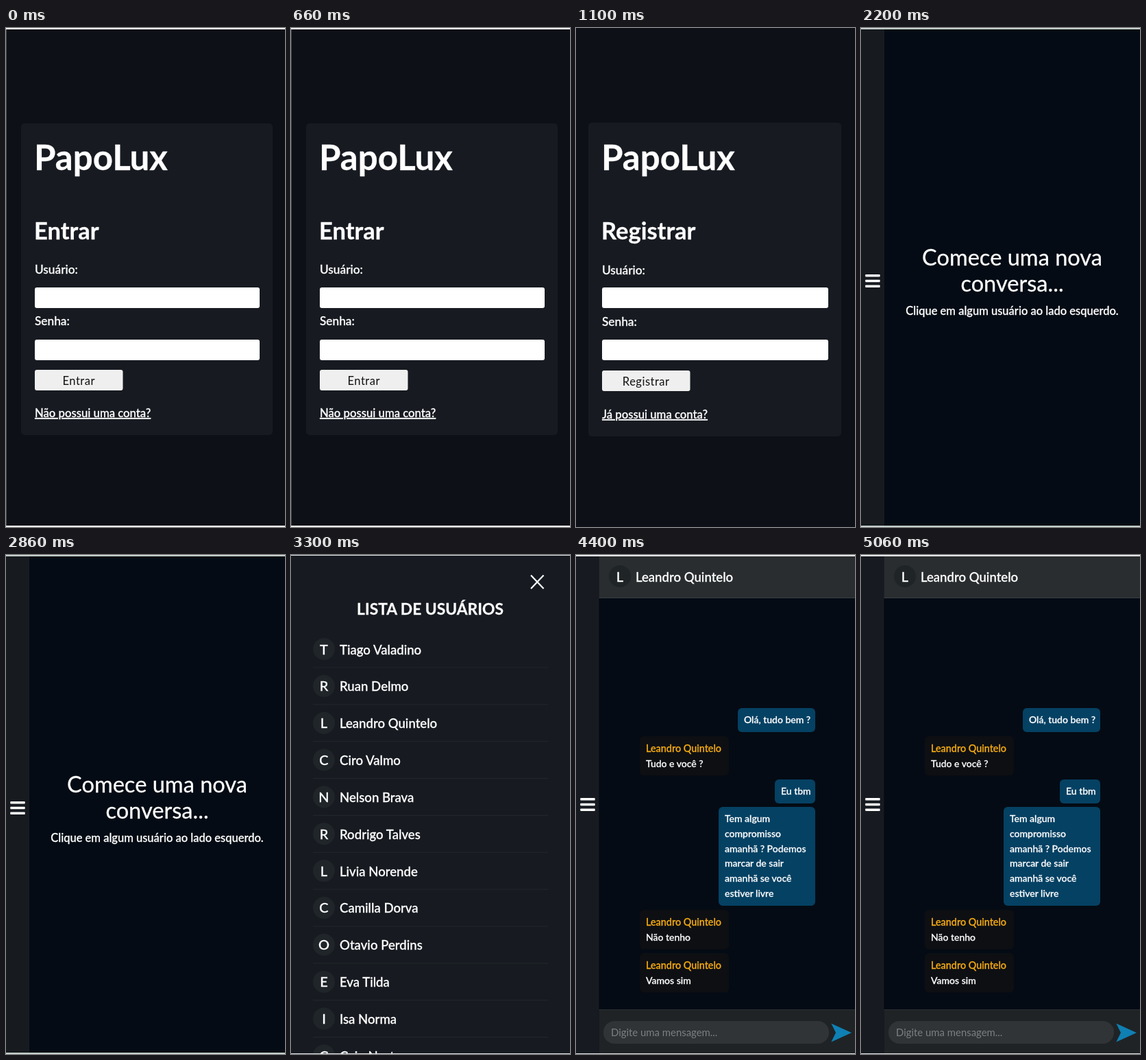
These frames come from a looping animation (407 px wide and 727 px high, 5500 ms). An HTML page:

```html
<!DOCTYPE html>
<html lang="pt-BR">
<head>
<meta charset="utf-8">
<title>Chat</title>
<style>
  html, body { margin: 0; width: 100%; height: 100%; overflow: hidden; background: #0d1117; }
  svg { display: block; width: 407px; height: 727px; }
  text {
    --ink: #fff;
    font-family: Lato, "Noto Sans", sans-serif;
    font-weight: 500;
    fill: var(--ink);
    stroke: var(--ink);
    stroke-width: .3px;
    white-space: pre;
  }
  .bold { font-weight: 700; }
  .plain { font-weight: 400; }
  .mid { text-anchor: middle; }
  .link { text-decoration: underline; }
  .button { --ink: #111; font-weight: 400; stroke: none; letter-spacing: .5px; text-anchor: middle; }
  .sender { --ink: #f8ad12; }
  .hint { --ink: #7c7f82; font-weight: 400; stroke: none; }
  .screen { opacity: 0; animation: show 5.5s step-end infinite; }
  @keyframes show {
    0% { opacity: 1; }
    20%, 100% { opacity: 0; }
  }
</style>
</head>
<body>
<svg id="stage" viewBox="0 0 407 727"></svg>
<script>
const STEP = 1.1, LOOP = 5.5;
const CONTACT = "Leandro Quintelo";
const USERS = ["Tiago Valadino", "Ruan Delmo", CONTACT, "Ciro Valmo", "Nelson Brava",
  "Rodrigo Talves", "Livia Norende", "Camilla Dorva", "Otavio Perdins", "Eva Tilda",
  "Isa Norma", "Caio Nestor"];

const rect = (x, y, w, h, fill, r = 0) =>
  `<rect x="${x}" y="${y}" width="${w}" height="${h}" rx="${r}" fill="${fill}"/>`;
const text = (x, y, size, str, cls = "") =>
  `<text x="${x}" y="${y}" font-size="${size}" class="${cls}">${str}</text>`;

const avatar = (x, y, name, fill) =>
  `<circle cx="${x}" cy="${y}" r="16" fill="${fill}"/>` + text(x, y + 7.5, 20, name[0], "mid");

const menu = middle => [-1, 0, 1].map(i =>
  rect(6.3, middle + i * 7.7 - 1.8, 21.4, 3.6, "#fff", 0.8)).join("");

// Light slivers along the top and bottom of the capture
const edges = (top, bottom, color) =>
  rect(0, 0, 407, top, color) + rect(0, 727 - bottom, 407, bottom, color);

function form({ x, right, top, bottom, dy, title, link }) {
  const w = right - x - 39;
  const left = x + 20;
  return rect(0, 0, 407, 727, "#0d1117") +
    rect(x, top, right - x, bottom - top, "#171b21", 5) +
    text(left - 1, 207, 51, "PapoLux", "bold") +
    text(left - 1, 308, 34.5, title, "bold") +
    text(left, 358 + dy, 17.3, "Usuário:") +
    rect(left, 378, w, 30, "#fff", 3) +
    text(left, 433 + dy, 17.3, "Senha:") +
    rect(left, 454, w, 30, "#fff", 3) +
    rect(left, 498 + dy, 128.5, 30, "#efefef", 3) +
    text(left + 64.2, 520 + dy, 16.5, title, "button") +
    text(left, 567 + dy * 2, 16.7, link, "link");
}

function welcome() {
  return rect(0, 0, 407, 727, "#040b14") + rect(0, 0, 34, 727, "#171b20") + menu(368.5) +
    text(220.5, 346, 32.6, "Comece uma nova", "plain mid") +
    text(220.5, 384, 32.6, "conversa...", "plain mid") +
    text(220.5, 418, 16.5, "Clique em algum usuário ao lado esquerdo.", "mid") +
    edges(2, 2, "#c5d0ca");
}

function userList() {
  const rows = USERS.map((name, i) => {
    const y = 137 + i * 53.85;
    return avatar(48, y, name, "#20252a") + text(71, y + 7.5, 18.6, name) +
      rect(32, y + 26.5, 343, 1, "#22272c");
  }).join("");
  return rect(0, 0, 407, 727, "#171b21") +
    `<path d="M350 29.5L368.5 49M368.5 29.5L350 49" stroke="#fff" stroke-width="2.2"/>` +
    text(203, 87, 22.8, "LISTA DE USUÁRIOS", "bold mid") + rows + edges(1, 1, "#e4e6e6");
}

function sent(x, y, lines) {
  const h = Math.round(lines.length * 21.75 + 13.7);
  return rect(x, y, 349 - x, h, "#054163", 6) +
    lines.map((s, i) => text(x + 9, y + 22 + i * 21.75, 14, s)).join("");
}

function received(y, str) {
  return rect(93, y, 130, 57.5, "#0d0f13", 6) +
    text(102, y + 23, 14.4, CONTACT, "sender") + text(102, y + 44.5, 14, str);
}

function chat() {
  return rect(0, 0, 407, 727, "#040b14") + rect(0, 0, 33.5, 727, "#171b21") + menu(363.5) +
    rect(33.5, 0, 374, 62, "#292d2f") + rect(33.5, 62, 374, 1, "#3a3f41") +
    avatar(64, 31, CONTACT, "#1f2427") + text(87, 38.5, 18.6, CONTACT) +
    sent(236, 223, ["Olá, tudo bem ?"]) +
    received(264, "Tudo e você ?") +
    sent(290, 327, ["Eu tbm"]) +
    sent(208, 367, ["Tem algum", "compromisso", "amanhã ? Podemos", "marcar de sair",
      "amanhã se você", "estiver livre"]) +
    received(517, "Não tenho") +
    received(580, "Vamos sim") +
    rect(33.5, 663, 374, 64, "#1f2326") + rect(33.5, 662, 374, 1, "#2b3033") +
    rect(40, 679, 329, 33, "#303436", 16) +
    text(51, 700.5, 14.9, "Digite uma mensagem...", "hint") +
    `<path d="M372.3 682.5L402 696L372.3 709.5L379 696Z" fill="#0f80b4"/>` +
    edges(2, 1, "#e4e6e6");
}

const screens = [
  form({ x: 22, right: 389, top: 139, bottom: 593, dy: 0, title: "Entrar",
    link: "Não possui uma conta?" }) + rect(0, 0, 1, 727, "#4a4d51") + edges(2, 2, "#fff"),
  form({ x: 18, right: 387, top: 138, bottom: 595, dy: 1, title: "Registrar",
    link: "Já possui uma conta?" }),
  welcome(), userList(), chat()
];

document.getElementById("stage").innerHTML = screens.map((body, i) =>
  `<g class="screen" style="animation-delay:${(i ? i * STEP - LOOP : 0).toFixed(1)}s">${body}</g>`
).join("");
</script>
</body>
</html>
```
